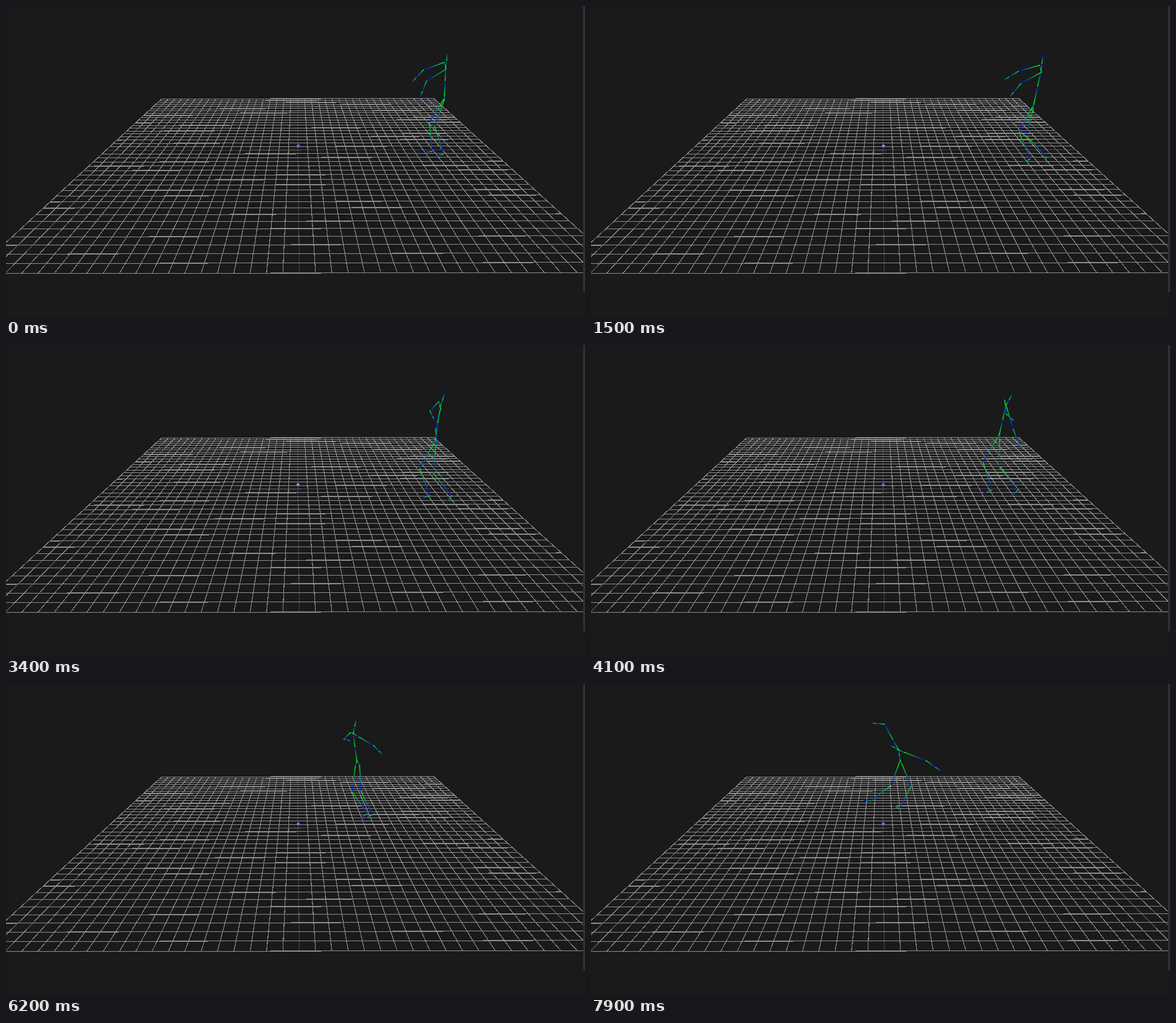
Write an HTML page that moves like this. It is 935 px wide and 503 px high and loops after 8000 ms.

```html
<!DOCTYPE html>
<html lang="en">
<head>
<meta charset="utf-8">
<title>Skeleton on a grid</title>
<style>
  html, body { margin: 0; width: 100%; height: 100%; overflow: hidden; background: #1a1a1a; }
  svg { display: block; width: 935px; height: 503px; }
</style>
</head>
<body>
<svg id="stage" viewBox="0 0 935 503">
  <defs id="defs"><clipPath id="view"><rect width="932" height="503"/></clipPath></defs>
  <rect width="935" height="503" fill="#1a1a1a"/>
  <g clip-path="url(#view)" fill="none" stroke-width="1.15" shape-rendering="crispEdges">
    <path id="axes" stroke="#484848"/>
    <path id="grid" stroke="#8c8c8c"/>
  </g>
  <rect x="932" width="3" height="463" fill="#333"/>
  <g id="bones" stroke-width="1.45" stroke-linecap="round"></g>
  <path d="M472 223l3 3.2-3 3.2-3-3.2z" fill="#6a6aff"/>
  <circle id="glint" r="1.4" fill="#e4e4ff"/>
</svg>
<script>
const LOOP = 8000, STEP = 100, HALF = 20;
const byId = id => document.getElementById(id);

function add(parent, tag, attrs) {
  const node = document.createElementNS('http://www.w3.org/2000/svg', tag);
  for (const name in attrs) node.setAttribute(name, attrs[name]);
  return parent.appendChild(node);
}

// Perspective floor: cell width is the reciprocal of depth, with a slight camera roll.
const NEAR = 26.4, FAR = 11, ROLL = 0.0019;
function floorPoint(u, row) {
  const cell = 1 / (1 / NEAR + (1 / FAR - 1 / NEAR) * row / (2 * HALF));
  const k = (cell - FAR) / (NEAR - FAR);
  return [471 + 2.5 * k + u * cell, 150 + 282 * k - ROLL * u * cell];
}
const segment = (a, b) => `M${a.map(n => n.toFixed(2))}L${b.map(n => n.toFixed(2))}`;

function drawFloor() {
  let grid = '', axes = '';
  for (let i = 0; i <= 2 * HALF; i++) {
    const lines = segment(floorPoint(i - HALF, 0), floorPoint(i - HALF, 2 * HALF)) +
                  segment(floorPoint(-HALF, i), floorPoint(HALF, i));
    if (i === HALF) axes += lines; else grid += lines;
  }
  byId('grid').setAttribute('d', grid);
  byId('axes').setAttribute('d', axes);
}

// Monotone cubic through keys of the form [time, ...values].
function curve(...keys) {
  const last = keys.length - 1;
  const slope = (n, c) => (keys[n + 1][c] - keys[n][c]) / (keys[n + 1][0] - keys[n][0]);
  const tangent = (n, c) => {
    if (n === 0) return slope(0, c);
    if (n === last) return slope(last - 1, c);
    const a = slope(n - 1, c), b = slope(n, c);
    return a * b <= 0 ? 0 : 2 * a * b / (a + b);
  };
  return t => {
    let i = 0;
    while (i < last - 1 && t >= keys[i + 1][0]) i++;
    const span = keys[i + 1][0] - keys[i][0];
    const p = (t - keys[i][0]) / span, q = 1 - p;
    return keys[i].slice(1).map((from, n) => {
      const c = n + 1;
      return from * (1 + 2 * p) * q * q + keys[i + 1][c] * p * p * (3 - 2 * p) +
             span * (tangent(i, c) * p * q * q - tangent(i + 1, c) * p * p * q);
    });
  };
}

function smooth(from, to, x) {
  const p = Math.min(1, Math.max(0, (x - from) / (to - from)));
  return p * p * (3 - 2 * p);
}
const mix = (a, b, p) => a.map((n, i) => n + (b[i] - n) * p);
const rad = degrees => degrees * Math.PI / 180;

// Angles start at straight down and grow towards the right.
const reachFrom = ([x, y], angle, length) =>
  [x + length * Math.sin(rad(angle)), y + length * Math.cos(rad(angle))];

const pelvisAt = curve([0, 708, 150], [800, 714, 163], [2700, 713, 165], [4100, 658, 151],
                       [5300, 604, 132], [7100, 532, 132], [7900, 500, 128]);
const neckAt = curve([0, 710, 100], [1200, 727, 105], [2700, 720, 102], [4100, 670, 98],
                     [5300, 606, 83], [6300, 555, 80], [7100, 499, 98], [7900, 497, 107]);
const headTilt = curve([0, 7], [2700, 8], [4100, 29], [5300, 27], [7100, -17], [7900, -60]);
const hipTwist = curve([0, 0], [5300, -2], [7100, 9], [7900, -2]);

// Arms: upper angle, lower angle, upper length.
const freeArm = curve([0, -70, -43, 36], [1500, -74, -59, 36], [2700, -94, -10, 19],
                      [4100, 7, 49, 23], [5300, -21, 52, 14], [7100, -63, 95, 18], [7900, 69, 55, 38]);
const throwArm = curve([0, -59, -22, 37], [1500, -61, -40, 38], [2700, -46, -17, 30],
                       [4100, 17, 18, 38], [5300, 30, 23, 30], [7100, 113, 92, 25], [7900, 209, 265, 28]);

// Legs: thigh angle, shin angle.
const frontLeg = curve([0, -32, 6], [1000, -28, 22], [4100, -30, 18],
                       [5300, -19, 4], [7200, 22, 50], [7900, -20, -53]);
const backLeg = curve([0, -20, 18], [1000, -17, 44], [4100, 0, 39],
                      [5300, 35, 66], [6300, -8, 30], [7100, 4, -10], [7900, 22, -28]);

function arm(neck, [upper, lower, length], rest, width, open) {
  const shoulder = mix([neck[0] + rest[0], neck[1] + rest[1]], reachFrom(neck, upper, width), open);
  const elbow = reachFrom(shoulder, upper, length);
  const tip = reachFrom(elbow, lower, length * 0.77);
  return [neck, shoulder, elbow, mix(elbow, tip, 0.65), tip];
}

function leg(waist, hip, [thigh, shin], size) {
  const knee = reachFrom(hip, thigh, 44 * size);
  const ankle = reachFrom(knee, shin, 45 * size);
  const bend = 90 - 52 * smooth(37, 46, Math.abs(shin));
  return [waist, hip, knee, ankle, reachFrom(ankle, shin - bend, 12 * size)];
}

// Chains of joints, each from its root outwards.
function poseAt(t) {
  const pelvis = pelvisAt(t), neck = neckAt(t);
  const [tilt] = headTilt(t), [twist] = hipTwist(t);
  const waist = mix(pelvis, neck, 0.15);
  const crown = reachFrom(neck, 180 - tilt, 24 * Math.cos(rad(tilt * 0.8)));
  const open = smooth(5300, 7100, t);
  const size = 1.05 - 0.15 * smooth(3500, LOOP, t);
  const hip = side => [pelvis[0] + side * twist, pelvis[1] - side];
  return [
    [waist, mix(pelvis, neck, 0.58), neck, mix(neck, crown, 0.5), crown],
    arm(neck, freeArm(t), [-2, -9], 9, open),
    arm(neck, throwArm(t), [1, 2], 20, open),
    leg(waist, hip(1), frontLeg(t), size),
    leg(waist, hip(-1), backLeg(t), size)
  ];
}

// Every bone fades from green at its parent to blue at its end.
function makeBone(index) {
  const id = `fade${index}`;
  const fade = add(byId('defs'), 'linearGradient', { id, gradientUnits: 'userSpaceOnUse' });
  add(fade, 'stop', { offset: 0, 'stop-color': '#00ff00' });
  add(fade, 'stop', { offset: 1, 'stop-color': '#0000ff' });
  return [fade, add(byId('bones'), 'line', { stroke: `url(#${id})` })];
}

const bonesOf = chains => chains.flatMap(chain => chain.slice(1).map((end, i) => [chain[i], end]));
const bones = bonesOf(poseAt(0)).map((_, i) => makeBone(i));

function render(t) {
  bonesOf(poseAt(t)).forEach(([start, end], i) => {
    for (const node of bones[i]) {
      node.setAttribute('x1', start[0]);
      node.setAttribute('y1', start[1]);
      node.setAttribute('x2', end[0]);
      node.setAttribute('y2', end[1]);
    }
  });
  const turn = t / 640, glint = byId('glint');
  glint.setAttribute('cx', 472 + 1.3 * Math.sin(turn));
  glint.setAttribute('cy', 225.6 - 0.8 * Math.cos(turn));
  glint.setAttribute('opacity', 0.5 - 0.4 * Math.cos(turn * 2));
}

drawFloor();
const began = performance.now();
function tick() {
  const t = (performance.now() - began) % LOOP;
  render(Math.floor(t / STEP) * STEP);
  requestAnimationFrame(tick);
}
tick();
</script>
</body>
</html>
```
